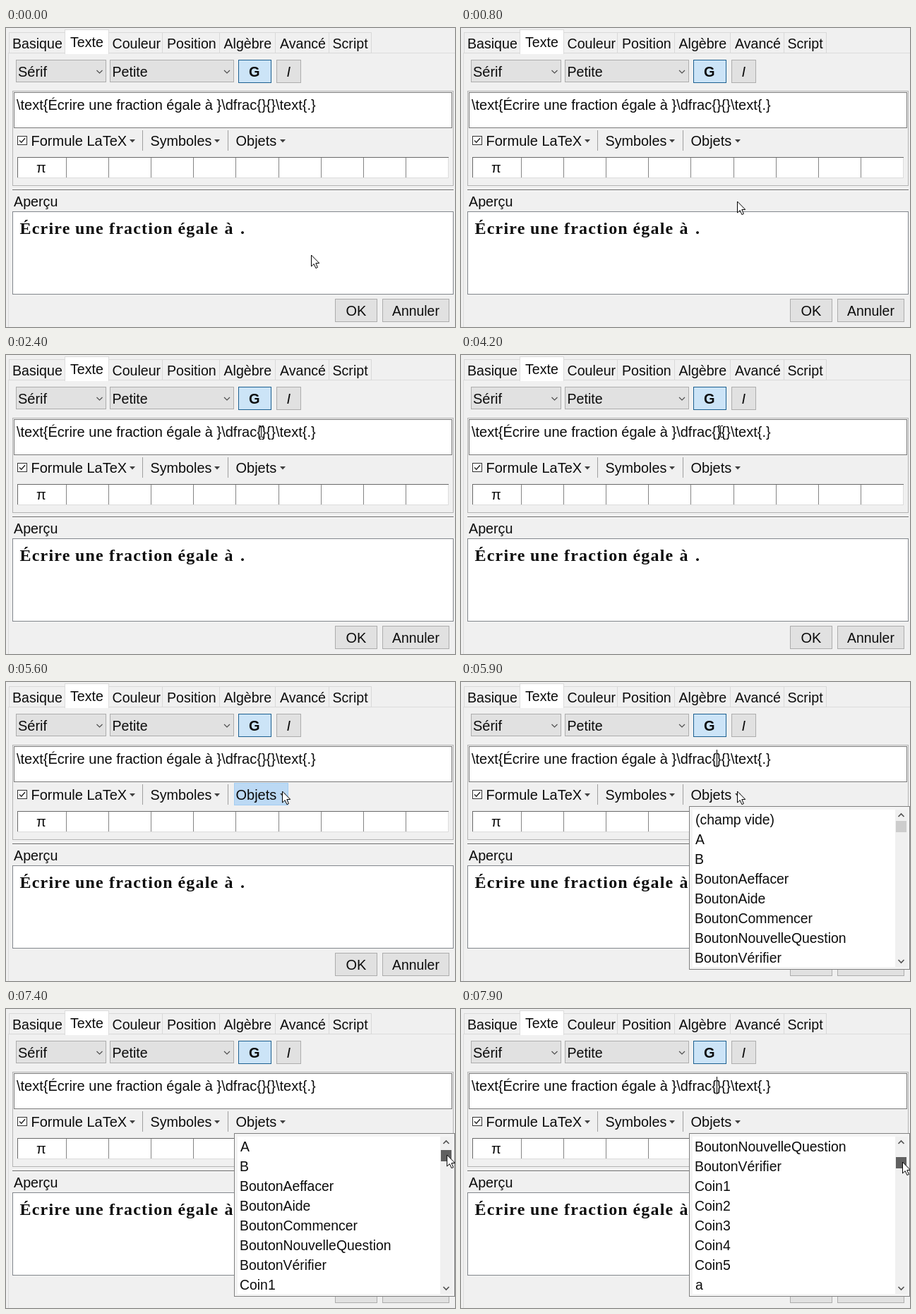
An HTML page with a canvas that plays this animation: 636 by 424 pixels, repeating every 8 s.

```html
<!DOCTYPE html>
<html lang="fr">
<head>
<meta charset="utf-8">
<title>Texte</title>
<style>
html, body { margin: 0; width: 100%; height: 100%; overflow: hidden; background: #f0f0f0; }
canvas { display: block; width: 636px; height: 424px; }
</style>
</head>
<body>
<canvas id="stage" width="636" height="424"></canvas>
<script>
const g = document.getElementById('stage').getContext('2d');
const LOOP = 8000, STEP = 100;
const SANS = '"Liberation Sans", Arial, sans-serif';
const SERIF = '"Liberation Serif", "Times New Roman", serif';
const FACE = '#e1e1e1', EDGE = '#adadad', INK = '#0c0c0c';

const ITEMS = ['(champ vide)', 'A', 'B', 'BoutonAeffacer', 'BoutonAide', 'BoutonCommencer',
  'BoutonNouvelleQuestion', 'BoutonVérifier', 'Coin1', 'Coin2', 'Coin3', 'Coin4', 'Coin5', 'a'];

// Pointer path: time, x, y
const PATH = [
  [0, 432.5, 322], [550, 432.5, 322], [800, 391.5, 246], [1100, 378, 178], [1400, 366, 116],
  [1600, 361, 108], [2600, 361, 108], [2900, 368, 108], [3050, 368, 108], [3500, 373, 109],
  [3650, 373, 109], [3800, 370, 108], [3950, 370, 108], [4200, 367, 108], [4400, 372, 117],
  [4800, 391.5, 155], [6200, 391.5, 155], [6500, 445.5, 181], [6900, 588, 199],
  [7150, 624.5, 204], [7250, 624.5, 204], [7900, 625.5, 217], [8000, 625.5, 217]
];
const MENU_OPEN = 5800, GRAB = 7200, CLICK = 2550, BLINK = 530;

function pointer(t) {
  let i = 1;
  while (PATH[i][0] < t) i++;
  const [t0, x0, y0] = PATH[i - 1], [t1, x1, y1] = PATH[i];
  const k = (t - t0) / (t1 - t0);
  return [x0 + (x1 - x0) * k, y0 + (y1 - y0) * k];
}

const inside = (x, y, l, t, r, b) => x >= l && x < r && y >= t && y < b;

function fill(x, y, w, h, color) {
  g.fillStyle = color;
  g.fillRect(x, y, w, h);
}

function box(l, t, r, b, color, edge) {
  fill(l, t, r - l, b - t, edge);
  fill(l + 1, t + 1, r - l - 2, b - t - 2, color);
}

function text(s, x, y, size = 20, style = '', family = SANS) {
  g.font = `${style} ${size}px ${family}`;
  g.fillStyle = INK;
  g.fillText(s, x, y);
}

function line(points, color, width) {
  g.beginPath();
  points.forEach(([x, y]) => g.lineTo(x, y));
  g.strokeStyle = color;
  g.lineWidth = width;
  g.stroke();
}

// dir 1 points down, -1 points up
function chevron(x, y, dir, color = '#505050', width = 1.2) {
  line([[x - 4, y - 2 * dir], [x, y + 2 * dir], [x + 4, y - 2 * dir]], color, width);
}

function triangle(x, y) {
  g.beginPath();
  g.moveTo(x - 4, y - 2);
  g.lineTo(x + 4, y - 2);
  g.lineTo(x, y + 2.5);
  g.fillStyle = '#404040';
  g.fill();
}

function tabs() {
  const edges = [4, 84, 145, 221, 302, 381, 457, 517];
  const names = ['Basique', 'Texte', 'Couleur', 'Position', 'Algèbre', 'Avancé', 'Script'];
  const left = [9, 91, 150.5, 228, 308.5, 388, 462.5];
  fill(3, 35, 633, 1, '#dcdcdc');
  fill(3, 35, 1, 389, '#dcdcdc');
  names.forEach((name, i) => {
    if (i !== 1) box(edges[i], 6, edges[i + 1] + 1, 36, '#f0f0f0', '#d9d9d9');
  });
  box(83, 2, 146, 37, '#ffffff', '#dcdcdc');
  fill(84, 35, 61, 2, '#ffffff');
  names.forEach((name, i) => text(name, left[i], i === 1 ? 27 : 29, 19.6));
}

function styleRow() {
  box(14, 45, 142, 77, FACE, EDGE);
  text('Sérif', 17, 69);
  chevron(132.5, 62, 1);
  box(147, 45, 323, 77, FACE, EDGE);
  text('Petite', 150.5, 69, 19.6);
  chevron(313, 62, 1);
  box(329, 45, 376, 78, '#cce4f7', '#1c6091');
  text('G', 344, 69, 20, 'bold');
  box(383, 45, 418, 78, FACE, EDGE);
  text('I', 397.5, 69, 20, 'italic');
}

function editor(hot, caret) {
  box(9, 89, 634, 224, '#f0f0f0', '#b4b4b4');
  box(11, 91, 632, 142, '#ffffff', '#7a7a7a');
  text('\\text{Écrire une fraction égale à }\\dfrac{}{}\\text{.}', 15, 116);
  if (caret) fill(362, 96, 1, 25, '#000000');

  if (hot) box(323, 143, 400, 175, '#bcd9f4', '#a3cdf2');
  box(16, 153, 30, 166, '#ffffff', '#333333');
  line([[19, 159.5], [21.8, 162.3], [27, 156.3]], '#222222', 1.4);
  text('Formule LaTeX', 35.5, 167);
  triangle(179, 160);
  fill(193, 145, 1, 29, '#a0a0a0');
  text('Symboles', 204.5, 167, 19.8);
  triangle(299, 160);
  fill(314, 145, 1, 29, '#a0a0a0');
  text('Objets', 325.5, 167);
  triangle(392, 160);
}

function symbols() {
  fill(16, 183, 611, 30, '#ffffff');
  fill(16, 183, 611, 1, '#696969');
  fill(16, 183, 1, 30, '#696969');
  fill(16, 212, 611, 1, '#dddddd');
  fill(626, 184, 1, 29, '#dddddd');
  for (let i = 0; i < 9; i++) fill(85 + Math.round(i * 60.1), 184, 1, 28, '#858585');
  text('π', 43, 205);
}

function preview() {
  fill(9, 229, 625, 1, '#696969');
  fill(9, 230, 625, 1, '#ffffff');
  text('Aperçu', 11, 253, 19.7);
  box(9, 260, 634, 378, '#ffffff', '#82868c');
  g.letterSpacing = '1.2px';
  [['Écrire', 19.5], ['une', 98], ['fraction', 146], ['égale', 243.5], ['à', 309.5], ['.', 332]]
    .forEach(([word, x]) => text(word, x, 292, 24, 'bold', SERIF));
  g.letterSpacing = '0px';
}

function buttons() {
  box(466, 384, 526, 417, FACE, EDGE);
  text('OK', 481.5, 408);
  box(533, 384, 628, 417, FACE, EDGE);
  text('Annuler', 547, 408, 19.4);
}

function menu(y, held) {
  const drag = held ? Math.max(0, y - 204) : 0;
  const first = Math.min(6, Math.round(drag * 6 / 13));
  box(323, 176, 636, 408, '#f4f4f4', '#808080');
  fill(328, 181, 287, 223, '#ffffff');
  fill(615, 181, 17, 223, '#f0f0f0');
  chevron(623.5, 189, -1, '#505050', 1.6);
  chevron(623.5, 396, 1, '#505050', 1.6);
  fill(616, 197 + Math.round(drag), 15, 16, held ? '#606060' : '#cdcdcd');
  ITEMS.slice(first, first + 8).forEach((s, i) => text(s, 332 - (s[0] === 'B' || s[0] === 'C' ? 1 : 0), 202 + i * 28, 19.4));
}

function arrow(x, y) {
  const shape = [[0, 0], [0, 16], [3.7, 12.6], [6.4, 18.6], [8.9, 17.5], [6.3, 11.6], [11.2, 11.4]];
  g.beginPath();
  shape.forEach(([dx, dy]) => g.lineTo(x + dx, y + dy));
  g.closePath();
  g.fillStyle = '#ffffff';
  g.fill();
  g.strokeStyle = '#000000';
  g.lineWidth = 1;
  g.stroke();
}

function beam(x, y) {
  x = Math.round(x);
  y = Math.round(y);
  fill(x, y - 7, 1, 15, '#000000');
  for (const end of [-8, 8]) {
    fill(x - 3, y + end, 3, 1, '#000000');
    fill(x + 1, y + end, 3, 1, '#000000');
  }
}

function draw(t) {
  const [x, y] = pointer(t);
  const open = t >= MENU_OPEN;
  const hot = !open && inside(x, y, 323, 143, 400, 176);
  const caret = t >= CLICK && (t - CLICK) % (2 * BLINK) < BLINK;
  fill(0, 0, 636, 424, '#f0f0f0');
  tabs();
  styleRow();
  editor(hot, caret);
  symbols();
  preview();
  buttons();
  if (open) menu(y, t >= GRAB);
  if (!open && inside(x, y, 12, 92, 631, 141)) beam(x, y);
  else arrow(x, y);
}

const start = performance.now();
function tick(now) {
  const t = Math.max(0, now - start) % LOOP;
  draw(Math.floor(t / STEP) * STEP);
  requestAnimationFrame(tick);
}
draw(0);
requestAnimationFrame(tick);
</script>
</body>
</html>
```
